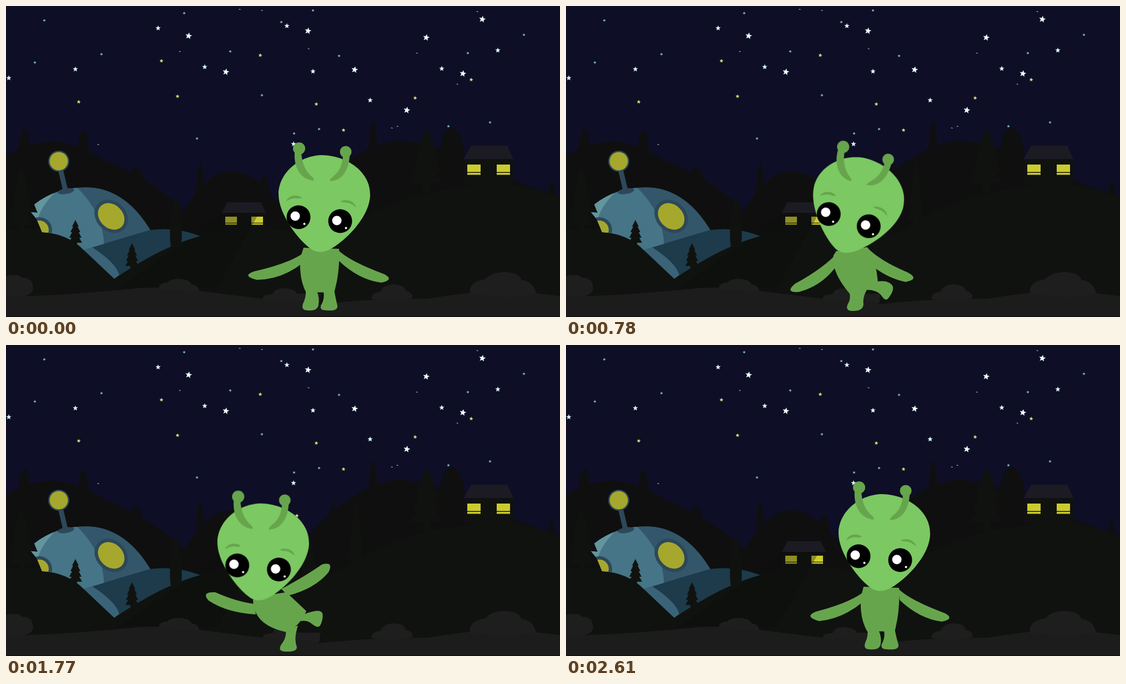
An HTML page without scripts for the animation above (2970 ms loop, 998 px wide and 561 px high).

```html
<!DOCTYPE html>
<html lang="en">
<head>
<meta charset="utf-8">
<title>Alien at night</title>
<style>
html, body { margin: 0; width: 100%; height: 100%; overflow: hidden; background: #0e0e26; }
svg { display: block; width: 100%; height: 100%; }
.far { fill: #0f0f0f; }
.near { fill: #10120f; }
.bush { fill: #1e1e1e; }
.skin { fill: #67a54d; }
.lit { fill: #cccb2e; }
.rim { fill: #2d4858; }
.glow { fill: #a5a82d; }

.alien > * { animation: 2970ms ease-in-out infinite; }
.alien .head { animation-name: head; transform-origin: 564.5px 444px; }
.alien .torso { animation-name: torso; }
.alien .arm-l { animation-name: arm-l; }
.alien .arm-r { animation-name: arm-r; }
.alien .foot-l { animation-name: foot-l; }
.alien .foot-r { animation-name: foot-r; }

/* crouch, hop left, wave, step back */
@keyframes head {
  0%, 3.03% { transform: translate(0, 0) rotate(0deg); }
  12.12%, 16.16% { transform: translate(-7px, 24px) rotate(0deg); }
  20.2% { transform: translate(-27px, -6px) rotate(4deg); animation-timing-function: linear; }
  26.26% { transform: translate(-67px, 0.5px) rotate(11.7deg); animation-timing-function: ease-out; }
  39.4% { transform: translate(-110px, 16px) rotate(1deg); }
  47.47% { transform: translate(-108px, 16.5px) rotate(-10.6deg); }
  55.56%, 59.5% { transform: translate(-111px, 16px) rotate(1deg); }
  59.59% { transform: translate(-110.7px, 16.8px) rotate(.3deg); animation-timing-function: cubic-bezier(.4, 0, .7, .8); }
  75.76% { transform: translate(-22px, 6.5px) rotate(0deg); animation-timing-function: ease-out; }
  87.88%, 100% { transform: translate(0, 0) rotate(0deg); }
}
@keyframes torso {
  0%, 3.03% { d: path("M536 436 L600 438 Q602 480 591 517 Q566 516 541 517 Q528 495 530 455Z"); }
  12.12%, 16.16% { d: path("M531 460 L592 460 Q602 495 586 520 Q566 545 538 522 Q524 500 527 468Z"); }
  20.2% { d: path("M510 432 L573 434 Q577 476 570 513 Q545 516 518 515 Q503 490 505 452Z"); animation-timing-function: linear; }
  26.26% { d: path("M487 442 L543 435 Q560 460 562 502 Q540 516 512 520 Q478 480 482 450Z"); animation-timing-function: ease-out; }
  39.4%, 59.59% { d: path("M447 455 L505 446 Q524 464 541 480 Q530 506 506 518 Q446 506 445 460Z"); animation-timing-function: cubic-bezier(.4, 0, .7, .8); }
  75.76% { d: path("M517 442 L578 442 Q583 490 572 522 Q545 524 520 522 Q508 495 511 455Z"); animation-timing-function: ease-out; }
  87.88%, 100% { d: path("M536 436 L600 438 Q602 480 592 517 Q568 516 543 517 Q529 495 531 455Z"); }
}
@keyframes arm-l {
  0%, 3.03% { d: path("M538 444 Q512 464 446 479 Q424 487 452 494 Q497 493 534 464Z"); }
  12.12%, 16.16% { d: path("M530 465 Q495 467 443 453 Q420 453 438 467 Q485 488 528 483Z"); }
  20.2% { d: path("M512 440 Q484 464 426 484 Q406 493 432 499 Q474 494 508 466Z"); animation-timing-function: linear; }
  26.26% { d: path("M492 442 Q466 472 413 501 Q393 518 420 516 Q462 505 488 468Z"); animation-timing-function: ease-out; }
  39.4% { d: path("M448 469 Q412 467 372 451 Q346 451 361 467 Q398 486 450 486Z"); }
  47.47% { d: path("M446 464 Q408 453 377 438 Q357 436 366 452 Q398 482 450 485Z"); }
  55.56%, 59.5% { d: path("M448 469 Q412 467 372 451 Q346 451 361 467 Q398 486 450 486Z"); }
  59.59% { d: path("M447 467 Q415 463 377 446 Q351 445 365 461 Q398 483 450 486Z"); animation-timing-function: cubic-bezier(.4, 0, .7, .8); }
  75.76% { d: path("M518 446 Q490 457 430 449 Q404 454 427 467 Q475 479 514 466Z"); animation-timing-function: ease-out; }
  87.88%, 100% { d: path("M538 444 Q514 464 450 481 Q428 490 456 498 Q498 494 534 464Z"); }
}
@keyframes arm-r {
  0%, 3.03% { d: path("M598 440 Q618 460 682 484 Q700 494 676 499 Q636 494 600 460Z"); }
  12.12%, 16.16% { d: path("M592 461 Q630 470 682 467 Q704 474 680 485 Q640 495 592 481Z"); }
  20.2% { d: path("M571 436 Q592 458 658 482 Q680 492 654 497 Q612 492 574 458Z"); animation-timing-function: linear; }
  26.26% { d: path("M543 436 Q566 460 616 481 Q638 493 612 498 Q582 492 553 470Z"); animation-timing-function: ease-out; }
  39.4% { d: path("M494 442 Q540 426 580 409 Q607 408 590 425 Q556 448 508 453Z"); }
  47.47% { d: path("M496 440 Q530 412 556 380 Q576 370 570 389 Q556 425 510 452Z"); }
  55.56%, 59.5% { d: path("M495 441 Q538 423 575 404 Q600 402 586 419 Q556 445 508 452Z"); }
  59.59% { d: path("M496 440 Q536 419 569 396 Q591 390 581 410 Q556 440 508 452Z"); animation-timing-function: cubic-bezier(.4, 0, .7, .8); }
  75.76% { d: path("M574 443 Q612 438 652 422 Q676 418 663 435 Q624 462 576 459Z"); animation-timing-function: ease-out; }
  87.88%, 100% { d: path("M599 440 Q619 460 683 484 Q701 494 677 499 Q637 494 601 460Z"); }
}
@keyframes foot-l {
  0%, 3.03% { d: path("M540 512 Q541 525 535 537 Q531 549 543 549 Q562 551 563 538 Q565 528 560 514Z"); }
  12.12%, 16.16% { d: path("M538 510 Q522 518 526 533 Q517 549 531 549 Q553 551 553 539 Q558 535 566 531Z"); }
  26.26% { d: path("M510 512 Q514 528 508 537 Q502 550 516 550 Q535 551 536 538 Q534 526 542 512Z"); animation-timing-function: ease-out; }
  39.4%, 59.59% { d: path("M504 514 Q506 528 496 540 Q488 553 504 553 Q524 554 524 545 Q518 530 526 506Z"); animation-timing-function: cubic-bezier(.4, 0, .7, .8); }
  75.76% { d: path("M521 515 Q510 527 499 530 Q493 537 506 545 Q520 555 526 545 Q529 532 537 518Z"); animation-timing-function: ease-out; }
  87.88%, 100% { d: path("M543 512 Q545 525 539 537 Q535 549 547 549 Q566 551 567 538 Q569 528 563 514Z"); }
}
@keyframes foot-r {
  0%, 3.03% { d: path("M572 514 Q574 528 569 537 Q562 549 577 549 Q598 551 597 541 Q594 528 591 512Z"); }
  12.12%, 16.16% { d: path("M566 530 Q578 534 576 541 Q576 549 587 549 Q611 551 606 537 Q606 514 588 510Z"); }
  26.26% { d: path("M541 512 Q560 512 568 522 Q575 533 580 528 Q591 515 589 506 Q582 492 554 498Z"); animation-timing-function: ease-out; }
  39.4%, 59.59% { d: path("M524 500 Q540 494 551 503 Q562 512 566 506 Q572 494 570 484 Q566 474 536 486Z"); animation-timing-function: cubic-bezier(.4, 0, .7, .8); }
  75.76% { d: path("M548 516 Q552 530 546 539 Q539 552 554 552 Q574 553 574 543 Q569 530 573 514Z"); animation-timing-function: ease-out; }
  87.88%, 100% { d: path("M573 514 Q575 528 570 537 Q564 549 579 549 Q600 551 599 541 Q595 528 592 512Z"); }
}
</style>
</head>
<body>
<svg viewBox="0 0 998 561" preserveAspectRatio="none">
  <defs>
    <path id="star" d="M0-10 2.5-3.4 9.5-3.1 4 1.3 5.9 8.1 0 4.2-5.9 8.1-4 1.3-9.5-3.1-2.5-3.4Z"/>
    <use id="big" href="#star" transform="rotate(10) scale(.58)" fill="#fff" stroke="#4f8796" stroke-width="1.600" paint-order="stroke"/>
    <use id="mid" href="#star" transform="scale(.45)" fill="#f0fdff" stroke="#4f8796" stroke-width="1.600" paint-order="stroke"/>
    <use id="dim" href="#star" transform="scale(.29)" fill="#7fb9c2"/>
    <use id="gold" href="#star" transform="rotate(6) scale(.38)" fill="#dcdc78"/>
    <path id="speck" d="M-2 0Q0-1.5 2 .5L1 1Z" fill="#8fb5bd"/>
    <path id="cypress" d="M0 0Q7 4 8 22Q13 42 9 60H-9Q-13 42-8 22Q-7 4 0 0Z"/>
    <path id="fir" d="M0 0 6 12H4L9 22H6L11 32H7L12 41H3V48H-3V41H-12L-7 32H-11L-6 22H-9L-4 12H-6Z"/>
    <clipPath id="hull"><path d="M51 358Q90 327 145 327Q214 328 260 404L140 440Q110 410 65 408L55 384 45 372 57 373Z"/></clipPath>
  </defs>

  <rect width="998" height="561" fill="#0e0e26"/>
  <g>
    <use href="#big" x="329" y="54"/><use href="#big" x="396" y="119"/>
    <use href="#big" x="544" y="45"/><use href="#big" x="628" y="115"/>
    <use href="#big" x="757" y="57"/><use href="#big" x="858" y="24"/>
    <use href="#big" x="823" y="122"/><use href="#big" x="722" y="188"/>
    <use href="#mid" x="274" y="40"/><use href="#mid" x="125" y="114"/>
    <use href="#mid" x="5" y="130"/><use href="#mid" x="358" y="110"/>
    <use href="#mid" x="506" y="36"/><use href="#mid" x="553" y="118"/>
    <use href="#mid" x="656" y="170"/><use href="#mid" x="785" y="113"/>
    <use href="#mid" x="886" y="80"/><use href="#mid" x="518" y="249"/>
    <use href="#gold" x="280" y="99"/><use href="#gold" x="309" y="163"/>
    <use href="#gold" x="131" y="173"/><use href="#gold" x="458" y="89"/>
    <use href="#gold" x="559" y="177"/><use href="#gold" x="608" y="224"/>
    <use href="#gold" x="737" y="166"/><use href="#gold" x="838" y="133"/>
    <use href="#gold" x="524" y="308"/>
    <use href="#dim" x="69" y="26"/><use href="#dim" x="172" y="87"/>
    <use href="#dim" x="52" y="102"/><use href="#dim" x="321" y="13"/>
    <use href="#dim" x="404" y="82"/><use href="#dim" x="461" y="161"/>
    <use href="#dim" x="600" y="90"/><use href="#dim" x="496" y="29"/>
    <use href="#dim" x="553" y="8"/><use href="#dim" x="832" y="85"/>
    <use href="#dim" x="933" y="52"/><use href="#dim" x="872" y="210"/>
    <use href="#dim" x="797" y="217"/><use href="#dim" x="564" y="222"/>
    <use href="#dim" x="519" y="230"/><use href="#dim" x="344" y="239"/>
    <use href="#speck" x="166" y="250"/><use href="#speck" x="695" y="220"/>
    <use href="#speck" x="421" y="6"/><use href="#speck" x="461" y="8"/>
    <use href="#speck" x="313" y="82"/><use href="#speck" x="545" y="77"/>
    <use href="#speck" x="740" y="85"/><use href="#speck" x="849" y="10"/>
    <use href="#speck" x="813" y="141"/><use href="#speck" x="705" y="217"/>
    <use href="#speck" x="750" y="247"/>
  </g>

  <g class="far">
    <path d="M0 271Q40 245 85 245Q130 247 180 280Q268 314 320 370Q365 299 404 298Q450 300 484 350L540 350Q610 262 700 243Q770 244 828 282L998 345V561H0Z"/>
    <use href="#cypress" transform="translate(33 222)"/>
    <use href="#cypress" transform="translate(139 226)"/>
    <use href="#cypress" transform="translate(235 291) scale(1.2 .7)"/>
    <use href="#cypress" transform="translate(350 282) scale(.65 1.3)"/>
    <use href="#cypress" transform="translate(465 305)"/>
    <use href="#cypress" transform="translate(533 320)"/>
    <use href="#cypress" transform="translate(588 282) scale(.5 1)"/>
    <use href="#cypress" transform="translate(661 208) scale(.65 1)"/>
    <use href="#cypress" transform="translate(803 220) scale(2.1 1)"/>
    <use href="#cypress" transform="translate(983 315) scale(.6)"/>
  </g>
  <g class="near">
    <use href="#fir" transform="translate(28 290) scale(1.8 2.6)"/>
    <use href="#fir" transform="translate(545 344) scale(1.3 1.8)"/>
    <use href="#fir" transform="translate(630 278) scale(1.15 2.6)"/>
    <use href="#fir" transform="translate(758 221) scale(2.4)"/>
    <path d="M0 402Q180 400 340 412Q420 396 520 405Q570 430 625 393Q700 345 800 329Q900 306 998 345V561H0Z"/>
    <rect x="826" y="276" width="87" height="45"/>
    <rect x="391" y="373" width="75" height="35"/>
  </g>
  <path d="M838 252H903L914 276H825ZM399 354H459L468 373H389Z" fill="#1c1b24"/>
  <path class="lit" d="M831 286h24v13.500h-24zm0 15h24v3.500h-24zM884 286h24v13.500h-24zm0 15h24v3.500h-24zM395 380h21v11h-21zm0 12h21v2.500h-21zM442 380h21v11h-21zm0 12h21v2.500h-21z"/>
  <path d="M389 373H456L380 510H200L340 412Z" fill="#0b0d0a" opacity=".32"/>

  <g>
    <path d="M140 440L260 404Q305 398 350 415Q282 433 195 492Z" fill="#1d3b4b"/>
    <path d="M140 440L155 435Q198 463 204 485L195 492Z" fill="#3a6378"/>
    <g clip-path="url(#hull)">
      <rect x="40" y="320" width="230" height="125" fill="#33566a"/>
      <path d="M40 320H120Q182 375 176 445H40Z" fill="#457586"/>
      <path d="M40 345L95 330Q66 356 57 384L40 380Z" fill="#63959e"/>
      <circle class="rim" cx="60" cy="404" r="23"/>
      <circle class="glow" cx="60" cy="404" r="17"/>
    </g>
    <g transform="translate(189.500 379.500) rotate(45)">
      <ellipse class="rim" rx="33" ry="27"/>
      <ellipse class="glow" rx="26.500" ry="21"/>
    </g>
    <ellipse class="rim" cx="108" cy="334" rx="15" ry="5" transform="rotate(-10 108 334)"/>
    <path d="M98 294L107 332" stroke="#2d4858" stroke-width="9"/>
    <circle class="rim" cx="95" cy="280" r="19"/>
    <circle class="glow" cx="95" cy="280" r="16.500"/>
  </g>
  <g class="near">
    <use href="#fir" transform="translate(125 386)"/>
    <use href="#fir" transform="translate(227 428)"/>
    <use href="#cypress" transform="translate(306 346) scale(1 1.5)"/>
  </g>

  <path d="M0 524Q100 523 238 509Q290 506 340 513L462 528 485 519H567L563 538Q650 528 760 528Q840 515 900 512L998 523V561H0Z" fill="#1c1c1c"/>
  <g class="bush">
    <path d="M0 487Q22 482 29 490Q46 490 48 503Q53 521 28 524H0Z"/>
    <path d="M277 512Q272 500 290 499Q300 490 318 493Q332 495 334 502Q347 503 348 515Z"/>
    <path d="M463 528Q462 520 480 520Q484 509 502 509Q522 511 524 519H565V535Z"/>
    <path d="M659 529Q656 517 674 516Q680 502 700 502Q720 504 720 514Q734 516 732 527L700 533Z"/>
    <path d="M836 519Q832 498 863 493Q876 479 902 480Q926 482 928 494Q951 497 955 519L900 526Z"/>
  </g>
  <rect y="560" width="998" height="1" fill="#0b0b0b"/>

  <g class="alien">
    <path class="skin foot-l"/>
    <path class="skin foot-r"/>
    <path class="skin torso"/>
    <path class="skin arm-l"/>
    <path class="skin arm-r"/>
    <g class="head">
      <path d="M570 269C614 270 657 299 656 341C655 385 602 432 579 441Q565 447 552 440C527 424 491 375 491 340C491 300 530 269 570 269Z" fill="#7cc863"/>
      <g class="skin">
        <circle cx="528" cy="257" r="11"/>
        <circle cx="612" cy="263" r="10.500"/>
        <path d="M520 264C518 290 530 313 554 315C556 313 553 309 548 305C540 297 533 284 532 264Z"/>
        <path d="M619 270C618 295 606 315 584 316C582 313 588 309 593 304C601 297 606 286 607 270Z"/>
        <path d="M505 352C508 342 524 338 533 346C530 348 527 347 524 347C516 346 511 349 505 352Z"/>
        <path d="M603 352C613 348 627 351 631 363C626 360 622 356 616 355C610 354 607 355 603 352Z"/>
      </g>
      <circle cx="527" cy="381" r="21.500"/>
      <circle cx="602" cy="388" r="21.500"/>
      <g fill="#fff">
        <circle cx="521" cy="379" r="8.500"/>
        <circle cx="596" cy="387" r="8.500"/>
        <circle cx="537.500" cy="393" r="2"/>
        <circle cx="612.500" cy="400.500" r="2"/>
      </g>
    </g>
  </g>
</svg>
</body>
</html>
```
